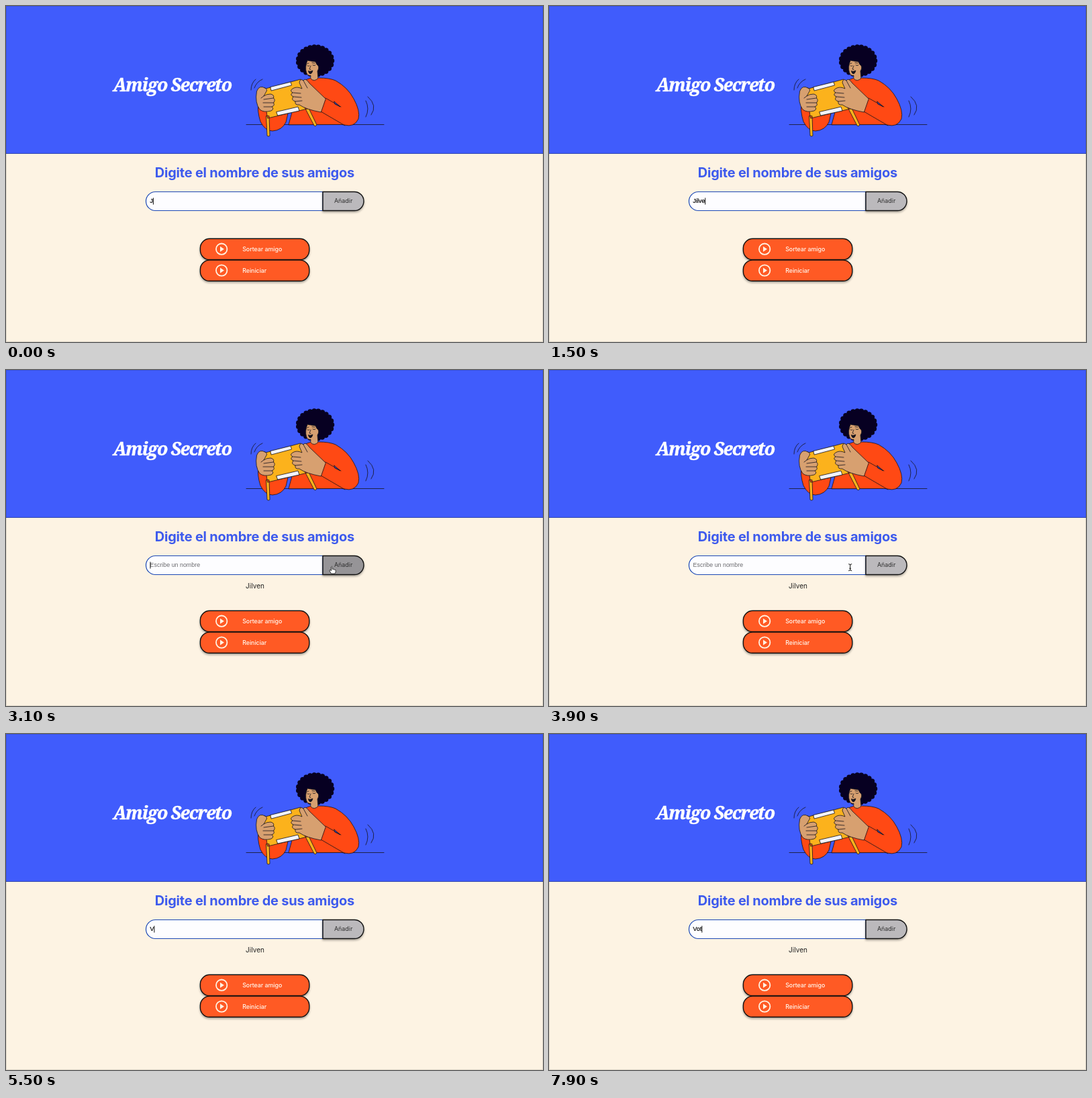
Animation of 800x500 px, one loop 8 s. Source, as an HTML page:

```html
<!DOCTYPE html>
<html lang="es">
<head>
<meta charset="utf-8">
<title>Amigo Secreto</title>
<style>
html, body { margin: 0; width: 100%; height: 100%; overflow: hidden; background: #fdf3e3; }
svg { display: block; width: 800px; height: 500px; }
text { font: 8.89px Inter, sans-serif; white-space: pre; }
#title { font: italic 800 26.5px "Noto Serif", serif; letter-spacing: -1.3px; fill: #fff; stroke: #fff; stroke-width: .5; }
#heading { font-size: 20px; font-weight: 700; letter-spacing: -.22px; fill: #3d5aed; }
#friend { font-size: 10px; fill: #222; }
#typed { font-family: "Liberation Sans", Arial, sans-serif; stroke-width: .2; }
#actions text { font-weight: 500; letter-spacing: -.05px; fill: #fff7ed; }
.mid { text-anchor: middle; }
.shadow { filter: drop-shadow(0 2px 1.5px rgba(0, 0, 0, .33)); }
.ink { stroke: #17131c; stroke-width: .8; stroke-linejoin: round; stroke-linecap: round; }
.line { fill: none; }
.skin { fill: #d7a070; }
.orange { fill: #ff4914; }
.yellow { fill: #fcb21c; }
.label { fill: #f3f4fa; }
</style>
</head>
<body>
<svg viewBox="0 0 800 500">
  <defs>
    <g id="pill">
      <rect class="shadow" x="289.4" y="346.3" width="162.4" height="31.2" rx="14" fill="#ff5a24" stroke="#111" stroke-width="1.4"/>
      <circle cx="321.2" cy="361.7" r="8.2" fill="none" stroke="#fff3e3" stroke-width="1.8"/>
      <path d="M319 357.7L325 361.7L319 365.7Z" fill="#fff3e3"/>
    </g>
    <path id="ibeam" d="M-2.500 -5Q0 -5 0 -3.500Q0 -5 2.500 -5M0 -4V4M-2.500 5Q0 5 0 3.500Q0 5 2.500 5M-1.300 1.500H1.300"/>
  </defs>

  <rect width="800" height="500" fill="#fdf3e3"/>
  <rect width="800" height="220" fill="#405cfc"/>
  <path d="M0 219.5H800" stroke="#3145ad"/>
  <rect x=".5" y=".5" width="799" height="499" fill="none" stroke="#000" opacity=".12"/>
  <text id="title" class="mid" x="247.8" y="127">Amigo Secreto</text>

  <g class="ink">
    <path class="line" d="M358 176.500H563M365 125Q365 115 372 109M370 122Q373 113 382 109M536 141Q542 153 536 165M539 135Q554 148 544 162"/>
    <!-- head -->
    <ellipse cx="460.5" cy="81.500" rx="25" ry="20.500" fill="#070022" stroke="#070022" stroke-width="7.500" stroke-dasharray="0 6.2"/>
    <ellipse cx="460.5" cy="81.500" rx="25.500" ry="21" fill="#070022" stroke="none"/>
    <path class="skin" d="M449 81Q445 91 447.500 99Q449 104 454 103.500L453.500 110Q459 116 465 109L464 97Q468 90 463 87L461 83Q454 82 449 81Z"/>
    <path class="line" d="M449 89Q450 90 452 89M457 88Q459 89.500 461 88M454 89L452 94L454 94.500M448.500 86L451 85M456 84.500L460 85"/>
    <path d="M450.500 97Q454 98 457 96Q456 101 453 101Q451 100 450.500 97Z" fill="#17131c"/>
    <!-- torso and raised arm -->
    <path class="orange" d="M421 176.500L437 118Q445 109 453.500 107.500Q459 114 465.500 107Q482 107 491 111Q509 121 518 138Q528 156 525 168Q519 181 504 177L500 176.500Z"/>
    <path d="M489 142L498 150L490 146Z" fill="#405cfc"/>
    <path class="line" d="M476 137L499 150M469 157L505 178"/>
    <!-- lower sleeve -->
    <path class="orange" d="M376 145Q374 156 379 172Q386 186 397 186Q411 185 417 173L420 160L390 150Z"/>
    <!-- drum -->
    <path class="yellow" d="M387.500 164L389 193Q391 195 393 193L392 164ZM445 151L459 178Q461 180 463 177L450 150ZM383 124L439 109L453 152L390 167Z"/>
    <path class="label" d="M394 120.500L424 113L425.500 118L395.500 126ZM403 157.500L435 150L437 156L405 163Z"/>
    <!-- hands -->
    <path class="skin" d="M386 122Q377 117 373.500 127Q370.500 144 378 154Q384 159 395 156Q400 153 396 150Q401 148 398.500 144Q402 140 398.500 137Q400 132 394 131Q388 131 384 134L388.500 126Q389 123 386 122Z"/>
    <path class="line" d="M396 150L384 150M398.500 144L383 144M398.500 137L384 139M384 134L380 137"/>
    <path class="skin" d="M476 138L452 115Q446 106 443 111Q438 107 437 114L441 123Q433 119 427 123Q422 126 427 129Q422 132 428 135Q424 140 431 142Q430 148 437 147Q447 154 469 158Z"/>
    <path class="line" d="M427 129L439 130M428 135L440 136M431 142L441 141M443 111L449 122"/>
  </g>

  <text id="heading" class="mid" x="370.4" y="255">Digite el nombre de sus amigos</text>
  <path d="M472 276.500H222.500A14 14 0 0 0 222.500 304.500H472Z" fill="#fdfdff" stroke="#1c48b4" stroke-width="1.2"/>
  <path id="add" class="shadow" d="M472 276.500H519A14 14 0 0 1 519 304.500H472Z" stroke="#111" stroke-width="1.4"/>
  <text class="mid" x="502.6" y="293.4" fill="#2d2d2d">Añadir</text>
  <text id="typed" x="214.6" y="293.4"></text>
  <path id="caret" d="M0 285.500V295.500" stroke="#111"/>
  <text id="friend" class="mid" x="371" y="325.2">Jilven</text>

  <g id="actions">
    <use href="#pill"/>
    <use href="#pill" y="31.8"/>
    <text x="352.2" y="364.8">Sortear amigo</text>
    <text x="352.2" y="396.6">Reiniciar</text>
  </g>

  <g id="caps" class="shadow">
    <rect x="203.500" y="298" width="22" height="16.500" rx="8.2" fill="#3d6df5"/>
    <path d="M214.500 301.500L219 306H216.700V308.500H212.300V306H210ZM212.300 310H216.700V311.300H212.300Z" fill="none" stroke="#fff" stroke-width=".9" stroke-linejoin="round"/>
  </g>
  <g id="beam" fill="none">
    <use href="#ibeam" stroke="#fff" stroke-width="2"/>
    <use href="#ibeam" stroke="#111"/>
  </g>
  <path id="hand" d="M-2 5.500L-4.500 1.500Q-5 -.5 -3 .2L-2 1.300V-4.500Q-1.200 -6 -.3 -4.500V-1Q1 -2 1.500 -.6Q3 -1.400 3.300 0Q4.800 -.5 4.800 1.200Q4.800 4 3.500 5.500Z" fill="#fff" stroke="#111" stroke-width=".8" stroke-linejoin="round"/>
</svg>
<script>
const LOOP = 8000, ADDED = 2900;
const $ = id => document.getElementById(id);
const show = (id, on) => $(id).setAttribute("visibility", on ? "visible" : "hidden");
const within = (t, spans) => spans.some(([from, to]) => t >= from && t < to);

const typing = [
  [0, "J"], [450, "Ji"], [850, "Jil"], [1150, "Jilv"], [1350, "Jilve"], [1600, "Jilven"],
  [ADDED, ""], [5200, "V"], [5600, "Vo"], [5900, "Vot"], [6300, "Votu"], [7300, "Vot"]
];
const caretOn = [[0, 2000], [2500, 3500], [4000, 4500], [5000, LOOP]];
const pointer = [
  [2000, 300, 290], [2300, 340, 288], [2700, 486.5, 297.5],
  [3600, 486.5, 297.5], [4300, 391, 288], [5200, 391, 288]
];

function pointerAt(t) {
  const i = pointer.findIndex(key => key[0] > t);
  if (i < 1) return null;
  const [t0, x0, y0] = pointer[i - 1], [t1, x1, y1] = pointer[i];
  const p = (t - t0) / (t1 - t0), k = p * p * (3 - 2 * p);
  return [x0 + (x1 - x0) * k, y0 + (y1 - y0) * k];
}

function draw(t) {
  const value = typing.findLast(key => key[0] <= t)[1];
  const typed = $("typed"), added = t >= ADDED;
  const ink = value ? "#000" : "#6b6b6f";
  typed.textContent = value || "Escribe un nombre";
  typed.setAttribute("fill", ink);
  typed.setAttribute("stroke", value ? ink : "none");
  const width = value ? typed.getComputedTextLength() : 0;
  $("caret").setAttribute("transform", `translate(${215 + width})`);
  show("caret", within(t, caretOn));
  show("friend", added);
  $("actions").setAttribute("transform", `translate(0 ${added ? 12 : 0})`);
  show("caps", within(t, [[4400, 5300]]));

  const pos = pointerAt(t), hover = !!pos && pos[0] > 472;
  show("beam", pos && !hover);
  show("hand", hover);
  if (pos) $(hover ? "hand" : "beam").setAttribute("transform", `translate(${pos})`);
  $("add").setAttribute("fill", hover ? "#969497" : "#bbb9bc");
}

const start = performance.now();
function tick() {
  draw((performance.now() - start) % LOOP);
  requestAnimationFrame(tick);
}
tick();
</script>
</body>
</html>
```
